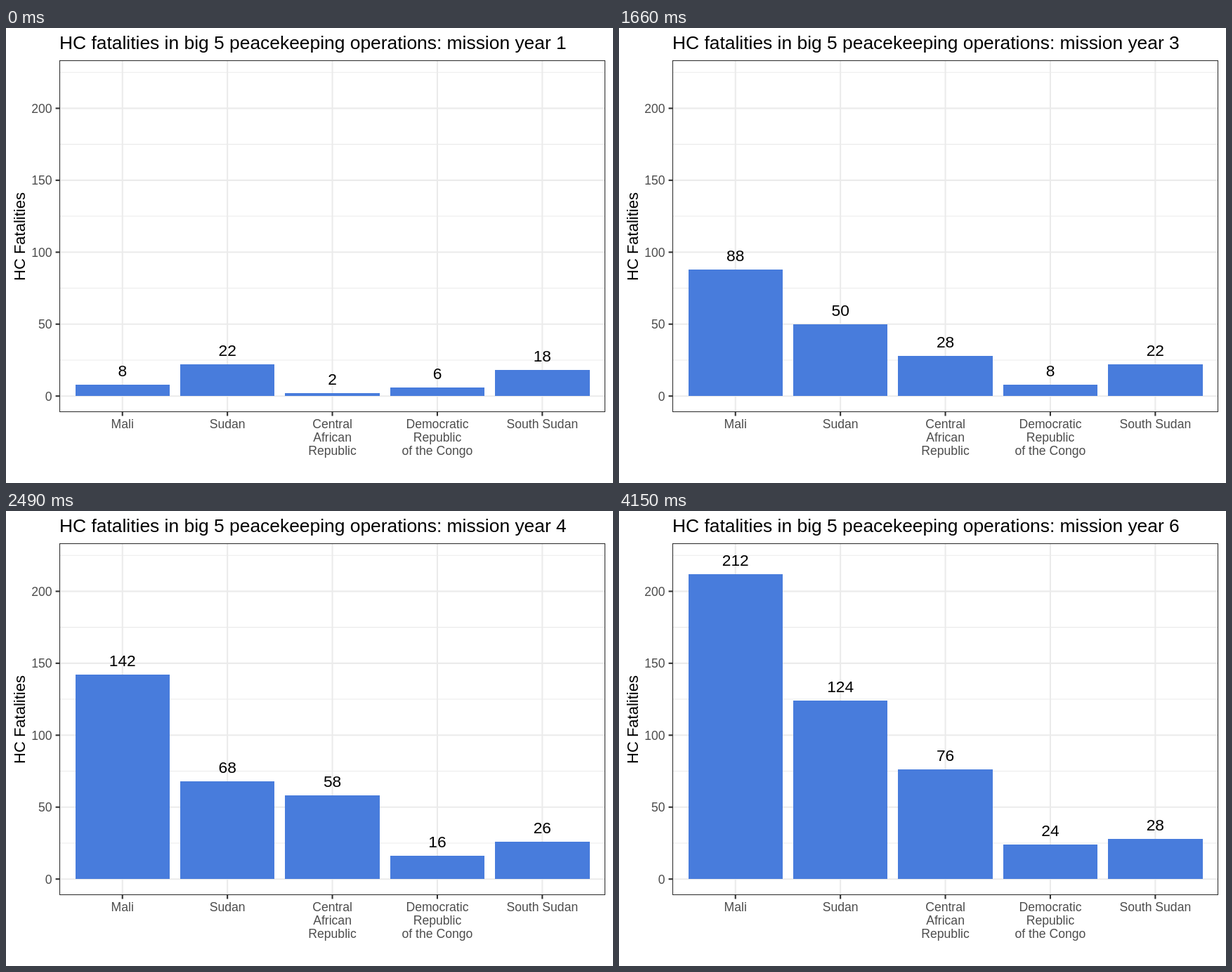
Write an HTML page that moves like this. It is 864 px wide and 648 px high and loops after 4.98 s.

```html
<!DOCTYPE html>
<html lang="en">
<head>
<meta charset="utf-8">
<title>Fatalities by mission year</title>
<style>
  html, body { margin: 0; width: 100%; height: 100%; overflow: hidden; background: #fff; }
  svg { display: block; font-family: "Liberation Sans", Arial, sans-serif; }
  .grid { stroke: #ebebeb; stroke-width: 2.13; }
  .minor { stroke-width: 1.07; }
  .tick { stroke: #333; stroke-width: 2.13; }
  .border { fill: none; stroke: #333; stroke-width: 1.1; }
  .axis { font-size: 17.6px; fill: #4d4d4d; }
  .bar { fill: #487cdc; shape-rendering: crispEdges; }
  .value { font-size: 22.76px; }
  .title { font-size: 26.4px; }
  .label { font-size: 22px; }
  .mid { text-anchor: middle; }
  .end { text-anchor: end; }
  .year { visibility: hidden; animation: show 4980ms step-end infinite; }
  @keyframes show {
    0% { visibility: visible; }
    16.666%, 100% { visibility: hidden; }
  }
</style>
</head>
<body>
<svg id="chart" width="864" height="648" viewBox="0 0 864 648"></svg>
<script>
const chart = document.getElementById('chart');
const STEP = 830;
const left = 76.1, right = 853, top_ = 46, bottom = 547;
const slot = (right - left) / 5.2;
const barWidth = slot * 0.9;
const xAt = i => left + slot * (0.6 + i);
const yAt = v => 524.2 - v * 2.049;

const places = [
  ['Mali'],
  ['Sudan'],
  ['Central', 'African', 'Republic'],
  ['Democratic', 'Republic', 'of the Congo'],
  ['South Sudan']
];
const years = [
  [8, 22, 2, 6, 18],
  [64, 40, 24, 6, 20],
  [88, 50, 28, 8, 22],
  [142, 68, 58, 16, 26],
  [190, 92, 72, 18, 26],
  [212, 124, 76, 24, 28]
];

function add(parent, tag, attrs, text) {
  const el = document.createElementNS(chart.namespaceURI, tag);
  for (const key in attrs) el.setAttribute(key, attrs[key]);
  if (text !== undefined) el.textContent = text;
  return parent.appendChild(el);
}
const line = (cls, x1, y1, x2, y2) => add(chart, 'line', { class: cls, x1, y1, x2, y2 });
const write = (parent, cls, x, y, text) => add(parent, 'text', { class: cls, x, y }, text);

// Grid and axes
for (let v = 25; v <= 225; v += 50) line('grid minor', left, yAt(v), right, yAt(v));
for (let v = 0; v <= 200; v += 50) {
  const y = yAt(v);
  line('grid', left, y, right, y);
  line('tick', left - 5.5, y, left, y);
  write(chart, 'axis end', 65.6, y + 6.3, v);
}
places.forEach((rows, i) => {
  const x = xAt(i);
  line('grid', x, top_, x, bottom);
  line('tick', x, bottom, x, bottom + 5.5);
  rows.forEach((row, r) => write(chart, 'axis mid', x, 570 + r * 19, row));
});
add(chart, 'text', { class: 'label mid', transform: 'translate(27.4 297) rotate(-90)' }, 'HC Fatalities');

// One group per mission year
years.forEach((values, n) => {
  const group = add(chart, 'g', { class: 'year' });
  group.style.animationDelay = (n ? (n - years.length) * STEP : 0) + 'ms';
  write(group, 'title', 76, 30.3, `HC fatalities in big 5 peacekeeping operations: mission year ${n + 1}`);
  values.forEach((v, i) => {
    const x = xAt(i), y = yAt(v);
    add(group, 'rect', { class: 'bar', x: x - barWidth / 2, y, width: barWidth, height: yAt(0) - y });
    write(group, 'value mid', x, y - 12, v);
  });
});

add(chart, 'rect', { class: 'border', x: 76.5, y: 46.5, width: 776, height: 500 });
</script>
</body>
</html>
```
